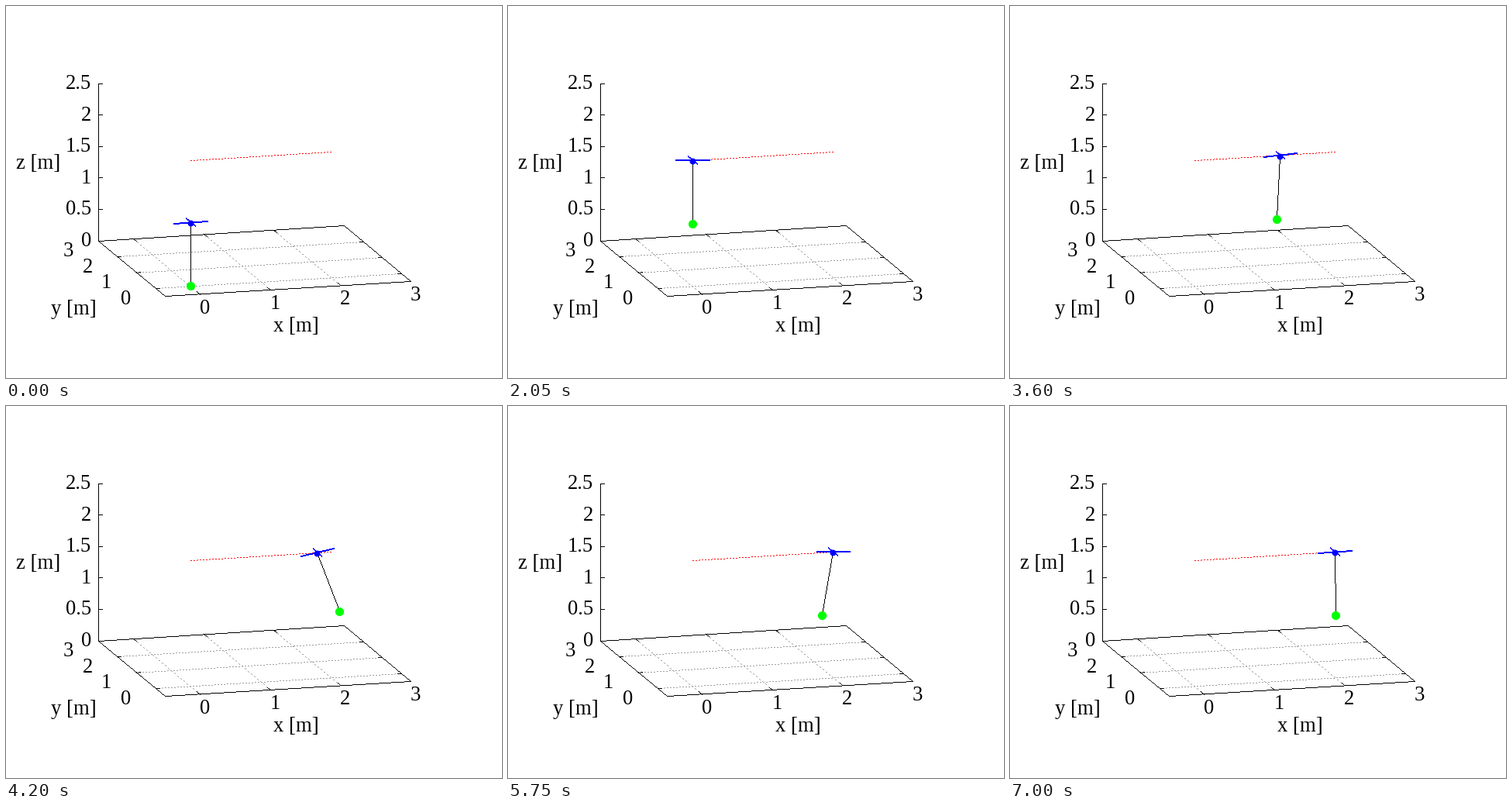
Animation, 640 px wide and 480 px high, one loop 7050 ms. Source, as a matplotlib script:

```python
import math

import numpy as np
import matplotlib.pyplot as plt
from matplotlib.animation import FuncAnimation

W, H, DPI = 640, 480, 100
FRAMES, STEP = 141, 50          # frames, ms per frame
PX = 72 / DPI                   # one pixel in points
G = 9.81
ROPE = 1.0
ARM = 0.24
LIFT, TOP = 1.012, 2.0
START, LAG, GOAL = 2.0, 0.022, 2.0

plt.rcParams["font.family"] = "Liberation Serif"


def project(x, y, z):
    """World metres to stage pixels."""
    return (237.0 + 90.6 * x - 24.6 * y,
            361.3 - 5.55 * x - 20.5 * y - 81.0 * z)


def bang_bang(t, dist, acc):
    """Full acceleration to the middle, then full braking."""
    end = 2 * math.sqrt(dist / acc)
    t = np.clip(t, 0, end)
    return np.where(t < end / 2, acc * t**2 / 2, dist - acc * (end - t)**2 / 2)


def simulate():
    """Craft position, tilt and rope angle for every frame."""
    dt = 0.001
    t = np.arange(FRAMES * STEP) * dt
    z = LIFT + bang_bang(t, TOP - LIFT, G)
    s = t - START
    x = bang_bang(s - LAG, GOAL, 1.0)
    x = x + np.where(s > 0.5, 0.04 * np.exp(-((s - 2.72) / 0.38)**2 / 2), 0)
    acc = np.gradient(np.gradient(x, dt), dt)
    swing = np.zeros_like(t)
    angle = rate = 0.0
    for i, a in enumerate(acc):
        swing[i] = angle
        rate -= dt * (G * math.sin(angle) + a * math.cos(angle)) / ROPE
        angle += dt * rate
    tilt = 0.06 * acc - 0.41 * np.sin(swing)
    return x[::STEP], z[::STEP], tilt[::STEP], swing[::STEP]


fig = plt.figure(figsize=(W / DPI, H / DPI), dpi=DPI, facecolor="white")
ax = fig.add_axes([0, 0, 1, 1])
ax.set_xlim(-0.5, W - 0.5)
ax.set_ylim(H - 0.5, -0.5)
ax.axis("off")


def pixels(p, q, width=1, dots=False):
    """Whole pixels of a stepped line from p to q."""
    p, q = np.round(p), np.round(q)
    n = int(np.abs(q - p).max())
    pts = np.round(p + np.linspace(0, 1, n + 1)[:, None] * (q - p))
    if dots:
        pts = pts[np.arange(n + 1) % 4 < 2]
    return np.vstack([pts - (0, i) for i in range(width)]).T


def layer(color="black", order=2):
    return ax.plot([], [], ",", color=color, zorder=order)[0]


def line(p, q, color="black", dots=False, order=2):
    layer(color, order).set_data(*pixels(p, q, dots=dots))


def disc(color, size, order):
    return ax.plot([], [], "o", color=color, ms=size * PX, mew=0,
                   antialiased=False, zorder=order)[0]


def label(x, base, text, align="center"):
    ax.text(x, base, text, fontsize=26.67 * PX, ha=align, va="baseline")


def tick(p, q, length=5):
    """Short mark from p towards q."""
    p, q = np.array(p), np.array(q)
    line(p, p + (q - p) * length / math.dist(p, q))


def draw_axes():
    lo, hi = -0.5, 3
    corners = [project(x, y, 0)
               for x, y in ((lo, lo), (hi, lo), (hi, hi), (lo, hi))]
    for p, q in zip(corners, corners[1:] + corners[:1]):
        line(p, q)
    for v in range(3):
        for p, q in ((project(v, lo, 0), project(v, hi, 0)),
                     (project(lo, v, 0), project(hi, v, 0))):
            line(p, q, "#a0a0a0", dots=True, order=1)
            tick(p, q)
            tick(q, p)
    for v in range(4):
        x, y = project(v, lo, 0)
        label(x + 6.7, y + 24.5, str(v))
        x, y = project(lo, v, 0)
        label(x - 38, y + 20, str(v))

    x0, y0 = corners[3]
    line((x0, y0), (x0, y0 - 203))
    for i in range(6):
        y = y0 - 40.6 * i
        tick((x0, y), (x0 + 10, y))
        label(109.7, y + 7, f"{i / 2:g}", "right")
    label(40.7, 209, "z [m]")
    label(374, 419, "x [m]")
    label(86.5, 397, "y [m]")


draw_axes()
line(project(0, 0, TOP), project(GOAL, 0, TOP), "red", dots=True, order=6)

rope = layer(order=3)
load = disc("#00ff00", 11.2, 4)
hub = disc("blue", 8, 5)
arm_x = layer("blue", 7)
arm_y = layer("blue", 7)

XS, ZS, TILTS, SWINGS = simulate()


def update(k):
    x, z, tilt, swing = XS[k], ZS[k], TILTS[k], SWINGS[k]
    center = project(x, 0, z)
    weight = project(x + ROPE * math.sin(swing), 0, z - ROPE * math.cos(swing))
    dx, dz = ARM * math.cos(tilt), ARM * math.sin(tilt)
    arm_x.set_data(*pixels(project(x - dx, 0, z + dz),
                           project(x + dx, 0, z - dz), 2))
    arm_y.set_data(*pixels(project(x, ARM, z), project(x, -ARM, z), 2))
    rope.set_data(*pixels(center, weight))
    for artist, spot in ((hub, center), (load, weight)):
        artist.set_data(*np.round(spot)[:, None])
    return rope, load, arm_x, arm_y, hub


anim = FuncAnimation(fig, update, frames=FRAMES, interval=STEP,
                     repeat=True, repeat_delay=0, blit=False)
plt.show()
```
